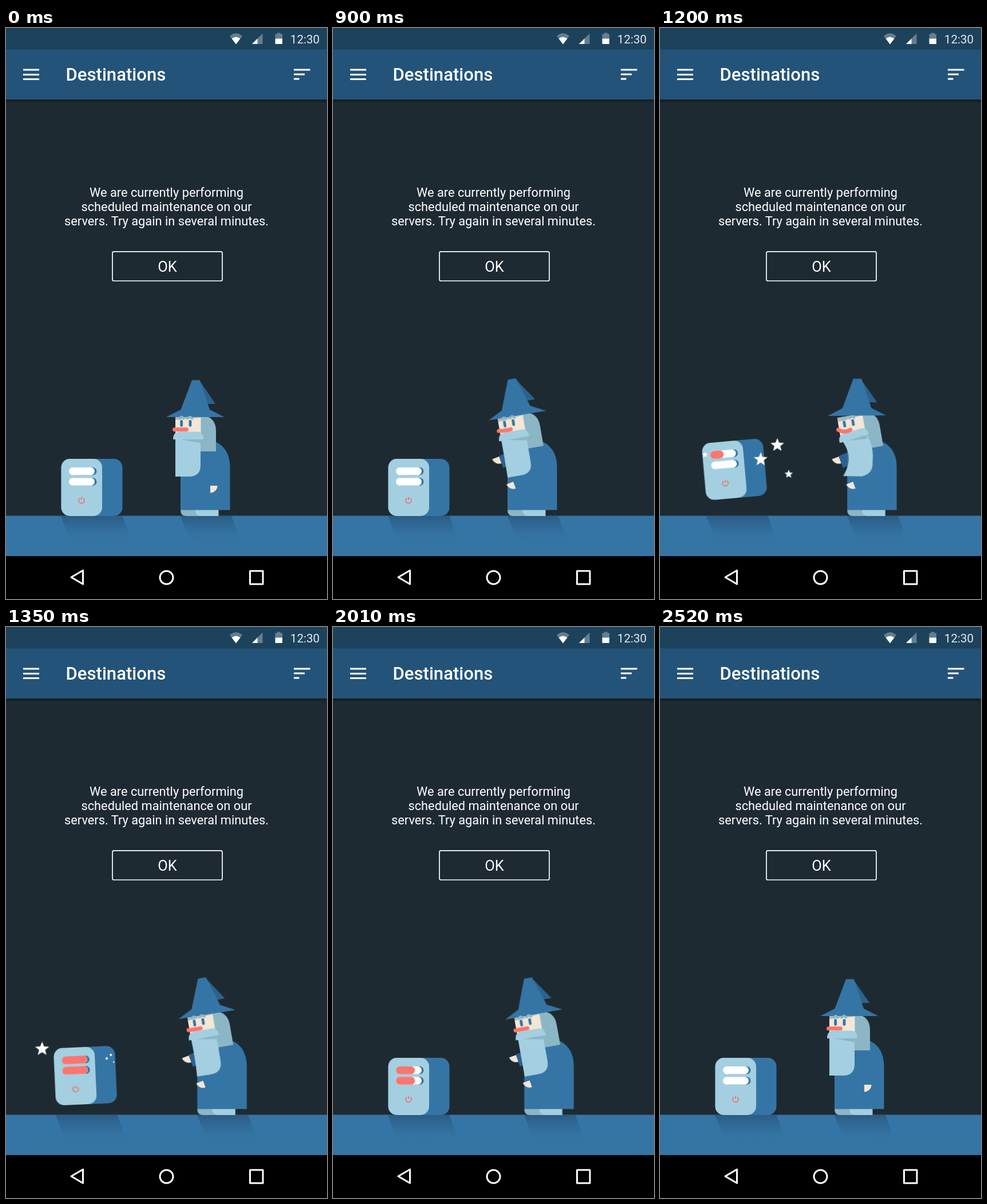
These frames come from a looping animation (561x998 px, 2700 ms). An HTML page:

```html
<!DOCTYPE html>
<html lang="en">
<head>
<meta charset="utf-8">
<title>Scheduled maintenance</title>
<style>
html, body { margin: 0; width: 100%; height: 100%; overflow: hidden; background: #1e2a32; }
svg { display: block; width: 561px; height: 998px; font-family: Roboto, sans-serif; }

.blue { fill: #3575a5; }
.dark { fill: #2d628e; }
.light { fill: #a3cfe0; }
.grey { fill: #8cb6c5; }
.skin { fill: #f3e6d5; }
.red { fill: #fa766f; }
.white { fill: #fff; }
.faint { fill: #fff; opacity: .32; }
.line { fill: none; stroke: #fff; stroke-width: 3; }

/* One shared 2700 ms loop */
.wizard, .head, .hat, .beard, .tache, .mouth, .eyes, .arm, .far,
.server, .cast, .led1, .led2, .alert, .burst, .spark {
  animation: 2700ms ease-in-out infinite;
}

.wizard { animation-name: recoil; }
@keyframes recoil {
  0%, 42.2% { transform: none; animation-timing-function: linear; }
  44.4% { transform: translateX(22px); animation-timing-function: ease-out; }
  48.9%, 85.6% { transform: translateX(29.3px); }
  93.3%, 100% { transform: none; }
}

.head { transform-origin: 311px 730px; animation-name: nod; }
@keyframes nod {
  0%, 12.2% { transform: rotate(0deg); }
  21.1%, 72.2% { transform: rotate(-9.8deg); }
  82.2%, 85.6% { transform: rotate(-13.2deg); }
  93%, 100% { transform: rotate(0deg); }
}

.hat { transform-origin: 330px 680px; animation-name: lift; }
@keyframes lift {
  0%, 32.2% { transform: rotate(0deg); }
  41.1% { transform: rotate(7.6deg); }
  44.4% { transform: rotate(9.3deg); }
  51.5%, 100% { transform: rotate(0deg); }
}

.beard { animation-name: blow; }
@keyframes blow {
  0%, 32.2% { d: path("M296 716Q296 750 296 784L320 784Q340 784 340 764Q340 738 340 712Z"); }
  41.1% { d: path("M296 716Q311 750 292.5 783L322 786Q343 784 343 764Q347 738 340 712Z"); }
  44.4% { d: path("M296 716Q316 750 289 780L320 786Q342 786 344 764Q352 738 340 712Z"); }
  51.5%, 100% { d: path("M296 716Q296 750 296 784L320 784Q340 784 340 764Q340 738 340 712Z"); }
}

.tache { transform-origin: 318px 712px; animation-name: curl; }
@keyframes curl {
  0%, 32.2% { transform: rotate(0deg); }
  40%, 45% { transform: rotate(-7deg); }
  51.5%, 100% { transform: rotate(0deg); }
}

.mouth { fill: none; stroke: #fa766f; stroke-width: 7; stroke-linecap: round; animation-name: smile; }
@keyframes smile {
  0%, 32.2% { d: path("M294.5 701.7Q305 701.7 315.5 701.7"); }
  36%, 46% { d: path("M294.5 699Q303 707 315.5 702.5"); }
  51.5%, 100% { d: path("M294.5 701.7Q305 701.7 315.5 701.7"); }
}

.eyes { transform-origin: 313px 691px; animation-name: blink; }
@keyframes blink {
  0%, .5% { transform: scaleY(1); }
  2.2%, 3% { transform: scaleY(.12); }
  4.4%, 62% { transform: scaleY(1); }
  63.7%, 64.5% { transform: scaleY(.12); }
  66%, 100% { transform: scaleY(1); }
}

.arm { transform-origin: 341px 766px; animation-name: reach; }
@keyframes reach {
  0%, 22.2% { transform: rotate(0deg); }
  30%, 72.2% { transform: rotate(69deg); }
  82.2%, 85.6% { transform: rotate(82deg); }
  91.1%, 100% { transform: rotate(0deg); }
}

.far { transform-origin: 316px 722px; animation-name: reach-far; }
@keyframes reach-far {
  0%, 22.2% { transform: translate(0, 0) rotate(0deg); }
  30%, 72.2% { transform: translate(0, 0) rotate(69deg); }
  82.2%, 85.6% { transform: translate(9px, -4px) rotate(80deg); }
  91.1%, 100% { transform: translate(0, 0) rotate(0deg); }
}

.server { transform-origin: 100px 853px; animation-name: hop; }
@keyframes hop {
  0%, 36.7% { transform: translate(0, 0) rotate(0deg); }
  41.1% { transform: translate(0, 0) rotate(-3.1deg); animation-timing-function: linear; }
  44.4% { transform: translate(-15px, -27px) rotate(-5.1deg); animation-timing-function: ease-out; }
  46.9% { transform: translate(-18px, -33px) rotate(-5.1deg); animation-timing-function: ease-in; }
  51.7%, 100% { transform: translate(0, 0) rotate(0deg); }
}

.cast { animation-name: cast; }
@keyframes cast {
  0%, 41.1% { transform: translateX(0); animation-timing-function: linear; }
  44.4% { transform: translateX(-15px); animation-timing-function: ease-out; }
  46.9% { transform: translateX(-18px); animation-timing-function: ease-in; }
  51.7%, 100% { transform: translateX(0); }
}

.led1, .led2 { width: 0; animation-timing-function: linear; }
.led1 { animation-name: fill1; }
.led2 { animation-name: fill2; }
@keyframes fill1 {
  0%, 42.6% { width: 0; }
  46.2%, 73.3% { width: 45px; }
  77.8%, 100% { width: 0; }
}
@keyframes fill2 {
  0%, 45.6% { width: 0; }
  49.2%, 73.3% { width: 45px; }
  77.8%, 100% { width: 0; }
}

.alert { opacity: 0; animation-name: alert; }
@keyframes alert {
  0%, 52.5% { opacity: 0; }
  55.6%, 71% { opacity: 1; }
  74.4%, 100% { opacity: 0; }
}

.burst { transform-origin: 176px 754px; animation-name: burst; }
@keyframes burst {
  0%, 33.3% { transform: scale(0); }
  39.5% { transform: scale(1.03); }
  41.1% { transform: scale(1); animation-timing-function: linear; }
  44.4% { transform: scale(.83); animation-timing-function: ease-in; }
  51.1%, 100% { transform: scale(0); }
}

.spark { animation-name: spark; }
@keyframes spark {
  0%, 43% { transform: translate(81px, 747px) scale(0); }
  44.4% { transform: translate(79px, 746px) scale(.35); animation-timing-function: ease-out; }
  48.9% { transform: translate(64px, 738px) scale(.9); animation-timing-function: ease-in; }
  55.6%, 100% { transform: translate(44px, 728px) scale(0); }
}
</style>
</head>
<body>
<svg viewBox="0 0 561 998">
  <defs>
    <linearGradient id="fade" x1="0" y1="0" x2="0" y2="1">
      <stop offset="0" stop-color="#2b5c85"/>
      <stop offset="1" stop-color="#3575a5" stop-opacity="0"/>
    </linearGradient>
    <linearGradient id="drop" x1="0" y1="0" x2="0" y2="1">
      <stop offset="0" stop-opacity=".38"/>
      <stop offset="1" stop-opacity="0"/>
    </linearGradient>
    <path id="star" d="M0-15 3.8-5.3 14.3-4.6 6.2 2 8.8 12.1 0 6.5-8.8 12.1-6.2 2-14.3-4.6-3.8-5.3Z"/>
    <path id="hand" d="M0 0H12.5A12.5 12.5 0 0 1 0 12.5Z"/>
    <path id="power" d="M-3-3.9A5 5 0 1 0 3-3.9M0-6V-.5" fill="none" stroke-width="1.7"/>
  </defs>

  <rect width="561" height="998" fill="#1e2a32"/>
  <rect y="125" width="561" height="7" fill="url(#drop)"/>
  <rect y="37" width="561" height="88" fill="#235379"/>
  <rect width="561" height="37.5" fill="#1d425c"/>

  <!-- Status bar -->
  <path class="faint" d="M391 14Q402 4.500 413 14L402 28.500Z"/>
  <path class="white" d="M394.500 18.500Q402 13 409.500 18.500L402 28.500Z"/>
  <path class="faint" d="M430 28H448.500V9.500Z"/>
  <path class="white" d="M430 28H439.500V18.500Z"/>
  <path class="faint" d="M470.500 18.500V10.500H474V8.500H479.500V10.500H483V18.500Z"/>
  <path class="white" d="M470.500 18.500H483V27Q483 28 482 28H471.500Q470.500 28 470.500 27Z"/>
  <text x="522.5" y="27" font-size="20.6" text-anchor="middle" fill="#e3eaee">12:30</text>

  <!-- Toolbar -->
  <path class="line" d="M30 73H58M30 81.500H58M30 89.500H58M503 73H531.500M503 81H522M503 89H512.500"/>
  <text x="104.500" y="92" font-size="31.1" font-weight="500" class="white">Destinations</text>

  <!-- Message -->
  <g class="white" text-anchor="middle">
    <g font-size="21.8">
      <text x="280.5" y="295">We are currently performing</text>
      <text x="280.5" y="320">scheduled maintenance on our</text>
      <text x="280.5" y="345">servers. Try again in several minutes.</text>
    </g>
    <text x="282" y="426" font-size="25.5">OK</text>
  </g>
  <rect x="186" y="390.800" width="192" height="51.200" rx="2.500" class="line" style="stroke-width:1.7"/>

  <rect y="852.500" width="561" height="71" class="blue"/>

  <!-- Server -->
  <path class="cast" fill="url(#fade)" d="M96 853H203.500L222 903H115Z"/>
  <g class="server">
    <rect x="96.500" y="753" width="107" height="100" rx="15" class="blue"/>
    <rect x="96.500" y="753" width="71.500" height="100" rx="15" class="light"/>
    <g class="blue">
      <rect x="113" y="768" width="45.500" height="13.500" rx="6.700"/>
      <rect x="113" y="786.300" width="45.500" height="13.500" rx="6.700"/>
    </g>
    <g class="white">
      <rect x="110" y="768" width="45" height="13.500" rx="6.700"/>
      <rect x="110" y="786.300" width="45" height="13.500" rx="6.700"/>
    </g>
    <g class="red">
      <rect class="led1" x="110" y="768" height="13.500" rx="6.700"/>
      <rect class="led2" x="110" y="786.300" height="13.500" rx="6.700"/>
    </g>
    <use href="#power" x="132" y="825.500" stroke="#f4706a"/>
    <g class="alert">
      <circle cx="132" cy="825" r="7.200" class="white"/>
      <use href="#power" transform="translate(132 825.300) scale(.82)" stroke="#8b8f92"/>
    </g>
  </g>

  <!-- Wizard -->
  <g class="wizard">
    <path fill="url(#fade)" d="M305 853H394L412 903H324Z"/>
    <g class="far">
      <path class="dark" d="M331 722H353V756H331Z"/>
      <use href="#hand" x="332" y="756" class="skin"/>
    </g>
    <path class="grey" d="M305 842H345V853H314Q305 853 305 842Z"/>
    <path class="light" d="M331 842H371.500V853H342Q331 853 331 842Z"/>
    <path class="blue" d="M305 842.500V720H358Q391.500 730 391.500 768V842.500Z"/>
    <g class="arm"><use href="#hand" x="357" y="800" class="skin"/></g>

    <g class="head">
      <path class="grey" d="M338 677H342Q367 679 367 705V740H338Z"/>
      <path class="skin" d="M296 678H340.500V714H296Z"/>
      <path fill="#a9babd" d="M296 678H340.500V681L296 685Z"/>
      <g class="eyes blue">
        <rect x="304.300" y="685" width="4.800" height="12" rx="2.400"/>
        <rect x="319.600" y="685" width="4.800" height="12" rx="2.400"/>
      </g>
      <path class="beard light" d="M296 716Q296 750 296 784L320 784Q340 784 340 764Q340 738 340 712Z"/>
      <g class="tache">
        <path class="grey" d="M300 718H340V725.500Z"/>
        <path class="light" d="M292 719Q292 705.500 304 705.500H334Q345 705.500 345 719Z"/>
      </g>
      <path class="mouth" d="M294.5 701.7Q305 701.7 315.5 701.7"/>
      <g class="hat">
        <path class="dark" d="M338 616 366 657H350Z"/>
        <path class="blue" d="M280 680 305.500 667 325 615.500H339L356 667 381.500 680Z"/>
      </g>
      <path d="M303.500 683Q307 676 310.500 683M317.500 683Q321.500 676 325.500 683" fill="none" stroke="#8cb6c5" stroke-width="3.500" stroke-linecap="round"/>
    </g>
  </g>

  <!-- Magic -->
  <g class="white">
    <g class="burst">
      <use href="#star" x="176" y="754"/>
      <use href="#star" x="211" y="724"/>
      <use href="#star" transform="translate(235 785) scale(.62)"/>
    </g>
    <use href="#star" class="spark"/>
  </g>

  <!-- Navigation bar -->
  <rect y="923" width="561" height="75" fill="#000"/>
  <g class="line" stroke-linejoin="round">
    <path d="M114 960 134.500 948V972Z"/>
    <circle cx="280.500" cy="960.500" r="11.500"/>
    <rect x="426.500" y="949" width="22.500" height="23"/>
  </g>
</svg>
</body>
</html>
```
